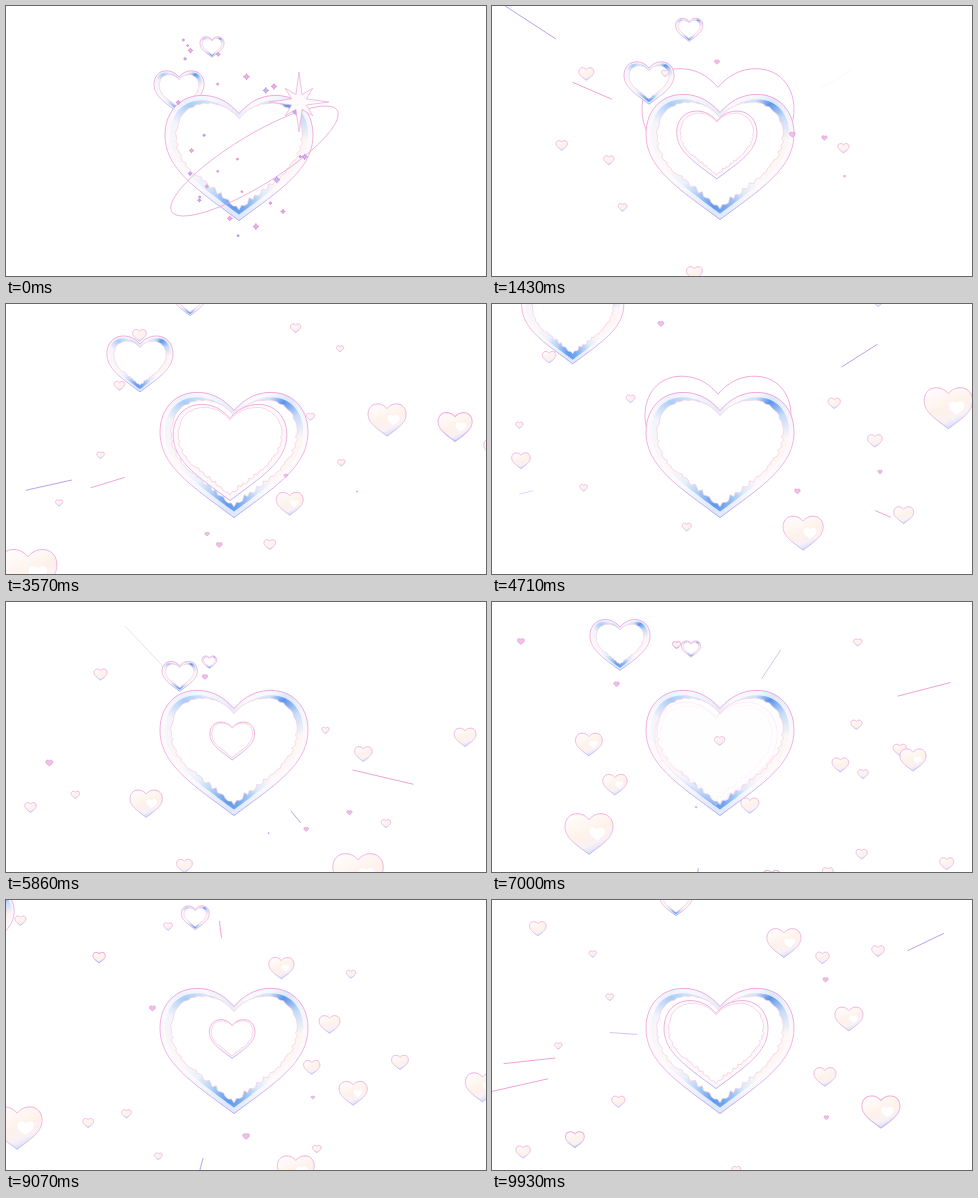
An HTML page with a canvas that plays this animation: 480 by 270 pixels, repeating every 10 s.

```html
<!DOCTYPE html>
<html lang="en">
<head>
<meta charset="utf-8">
<title>Glass hearts</title>
<style>
html, body { margin: 0; width: 100%; height: 100%; overflow: hidden; background: #fff; }
canvas { display: block; width: 480px; height: 270px; }
</style>
</head>
<body>
<canvas id="stage" width="480" height="270"></canvas>
<script>
const ctx = document.getElementById('stage').getContext('2d');
const LOOP = 10, FPS = 14, CX = 228, CY = 140, FLOW = .35;
const clamp = (v, a = 0, b = 1) => Math.min(b, Math.max(a, v));
const mix = (a, b, p) => a + (b - a) * p;
const repeat = (n, make) => Array.from({ length: n }, (_, i) => make(i));

function seeded(seed) {
  return () => {
    seed = seed + 0x6D2B79F5 | 0;
    let v = Math.imul(seed ^ seed >>> 15, 1 | seed);
    v = v + Math.imul(v ^ v >>> 7, 61 | v) ^ v;
    return ((v ^ v >>> 14) >>> 0) / 4294967296;
  };
}

// Right half of a heart one unit wide: two cubic curves from notch to tip.
const lobe = [[0, -.3], [.06, -.37], [.14, -.423], [.25, -.423]];
const side = [[.25, -.423], [.4, -.423], [.5, -.31], [.5, -.155]];
const foot = [[.5, -.155], [.5, .08], [.27, .22], [0, .423]];

function cubic(points, p) {
  const q = 1 - p, weights = [q * q * q, 3 * q * q * p, 3 * q * p * p, p * p * p];
  return [0, 1].map(axis => points.reduce((sum, pt, i) => sum + pt[axis] * weights[i], 0));
}
const rightHalf = [[lobe, 12], [side, 14], [foot, 36]]
  .flatMap(([curve, n]) => repeat(n, i => cubic(curve, i / n)));
const leftHalf = [...rightHalf.slice(1), [0, .423]].reverse().map(([x, y]) => [-x, y]);

// Closed heart whose lower flanks are nibbled inwards by up to `bite`.
function heartPath(bite = 0, seed = 1) {
  const random = seeded(seed), path = new Path2D();
  for (const [x, y] of [...rightHalf, ...leftHalf]) {
    const k = 1 - bite * random() ** 2 * clamp(y + .35, .15, .6);
    path.lineTo(x * k, y * k);
  }
  path.closePath();
  return path;
}
const heart = heartPath();
const ragged = heartPath(.16, 5);

function ramp(gradient, stops) {
  for (const [at, color] of stops) gradient.addColorStop(at, color);
  return gradient;
}
const sheen = ramp(ctx.createConicGradient(0, 0, 0), [
  [0, '#fdf6f3'], [.1, '#fcf8f9'], [.16, '#dcebfb'], [.24, '#6fa6f0'], [.27, '#5f9bef'],
  [.34, '#b5d4f8'], [.4, '#eaf2fc'], [.47, '#fdf8f7'], [.58, '#f4f4fc'], [.63, '#a9cdf7'],
  [.68, '#dcebfb'], [.74, '#7fb0f1'], [.79, '#eef4fc'], [.84, '#cfe2fb'], [.87, '#5a95ec'],
  [.91, '#c6dcf9'], [.96, '#fdf6f5'], [1, '#fdf6f3']]);
const rim = ramp(ctx.createLinearGradient(0, -.42, 0, .42),
  [[0, '#f3a9dc'], [.6, '#efb6e2'], [1, '#b3b0f2']]);
const cream = ramp(ctx.createLinearGradient(-.25, -.4, .1, .42),
  [[0, '#fffcfc'], [.5, '#fef2ea'], [.78, '#f9f1f5'], [1, '#cfdcfa']]);

function at(x, y, w, draw) {
  ctx.save();
  ctx.translate(x, y);
  ctx.scale(w, w);
  draw();
  ctx.restore();
}
function outline(path, w, width, color = rim) {
  ctx.lineWidth = width / w;
  ctx.strokeStyle = color;
  ctx.stroke(path);
}
function fill(path, style) {
  ctx.fillStyle = style;
  ctx.fill(path);
}
function withAlpha(alpha, draw) {
  if (alpha <= 0) return;
  ctx.globalAlpha = Math.min(1, alpha);
  draw();
  ctx.globalAlpha = 1;
}

function ring(x, y, w, hole, body) {
  at(x, y, w, () => {
    fill(heart, body);
    ctx.save();
    ctx.clip(heart);
    outline(heart, 1, .065, 'rgba(255,252,254,.8)');
    ctx.restore();
    outline(heart, w, 1);
  });
  at(x, y - w * .01, w * hole, () => {
    fill(ragged, '#fff');
    outline(ragged, w, .8, '#f6c9de');
  });
}

function bubble(x, y, w) {
  if (w < 1) return;
  at(x, y, w, () => {
    fill(heart, w < 7 ? '#f0c3e6' : cream);
    outline(heart, w, w < 7 ? .8 : 1, w < 7 ? '#dc97da' : rim);
  });
  if (w > 24) at(x + w * .17, y, w * .32, () => fill(heart, '#fff'));
}

function line(x1, y1, x2, y2, width, color) {
  ctx.lineWidth = width;
  ctx.strokeStyle = color;
  ctx.beginPath();
  ctx.moveTo(x1, y1);
  ctx.lineTo(x2, y2);
  ctx.stroke();
}

// Eight tapered rays, every other one shorter.
function star(x, y, r, inner, body, edge) {
  ctx.beginPath();
  for (let i = 0; i < 16; i++) {
    const a = i * Math.PI / 8, reach = i % 2 ? inner : i % 4 ? r * .65 : r;
    ctx.lineTo(x + Math.cos(a) * reach, y + Math.sin(a) * reach);
  }
  ctx.closePath();
  ctx.fillStyle = body;
  ctx.fill();
  ctx.lineWidth = .8;
  ctx.strokeStyle = edge;
  ctx.stroke();
}

// Large bubbles, each pinned where it passes: time, x, y, width.
const landmarks = [
  [3.57, 381, 116, 38], [3.57, 449, 123, 34], [3.57, 22, 270, 58], [4.71, 311, 229, 40],
  [7, 97, 232, 48], [7, 421, 158, 26], [8.29, 22, 144, 42], [8.29, 63, 207, 38],
  [8.29, 275, 240, 28], [8.29, 417, 176, 26], [9.93, 389, 212, 38], [9.93, 292, 43, 34],
  [9.93, 357, 119, 28], [9.93, 333, 177, 22]];

const random = seeded(42);
const swarm = repeat(64, i => ({
  birth: .2 + i * .152, angle: random() * 2 * Math.PI,
  start: mix(45, 130, random()), size: mix(.035, .13, random()),
}));
const streaks = repeat(52, i => ({
  birth: .5 + i * .183, angle: random() * 2 * Math.PI,
  start: mix(70, 170, random()), length: mix(15, 90, random()),
}));
const sparkles = repeat(27, () => ({
  x: mix(166, 300, random()), y: mix(27, 240, random()), r: mix(1.2, 3.6, random() ** 2),
}));

// Drifting rings keyed by time, x, y, width.
const tracks = [
  [[0, 173, 86, 50], [1.43, 157, 77, 50], [3.57, 134, 60, 66], [4.71, 81, 17, 102], [5.5, 20, -55, 130]],
  [[0, 206, 41, 24], [3.57, 184, -2, 32], [4.2, 180, -20, 34]],
  [[5.8, 176, 76, 34], [7, 128, 43, 60], [8.29, 41, 30, 68], [9.4, -60, 20, 80]],
  [[5.7, 204, 62, 14], [8.29, 194, 32, 24], [10.1, 183, -1, 33]]];

const pulseBirths = [.25, 1.9, 5.2, 6.85, 8.4];

function drawLandmark([time, x, y, w], t) {
  const age = t - time, k = Math.exp(FLOW * age);
  const grow = clamp((age + 2.3) / .5) * clamp((1.4 - age) / .3);
  bubble(CX + (x - CX) * k, CY + (y - CY) * k, w * k * grow);
}

function drawSwarmHeart({ birth, angle, start, size }, t) {
  const age = t - birth, life = 2.8;
  if (age < 0 || age > life) return;
  const d = start * Math.exp(FLOW * age);
  const grow = clamp(age / .3) * clamp((life - age) / .3);
  bubble(CX + Math.cos(angle) * d * 1.3, CY + Math.sin(angle) * d * .95, d * size * grow);
}

function drawStreak({ birth, angle, start, length }, i, t) {
  const age = t - birth;
  withAlpha(Math.min(age, .8 - age) / .15, () => {
    const near = start * Math.exp(1.2 * age), far = near + length;
    const dx = Math.cos(angle), dy = Math.sin(angle) * .6;
    line(CX + dx * near, CY + dy * near, CX + dx * far, CY + dy * far,
      1, i % 2 ? '#bda0ec' : '#efa3d6');
  });
}

function drawTrack(keys, t) {
  const i = keys.findIndex((key, n) => n && t >= keys[n - 1][0] && t < key[0]);
  if (i < 1) return;
  const a = keys[i - 1], b = keys[i], p = (t - a[0]) / (b[0] - a[0]);
  const [x, y, w] = [1, 2, 3].map(n => mix(a[n], b[n], p));
  ring(x, y, w, .8, sheen);
}

// A pale outline that slides up behind the main heart.
function drawEcho(peak, y, w, t) {
  withAlpha((1 - Math.abs(t - peak)) / .4, () =>
    at(226, y - 8 * (t - peak), w, () => {
      fill(heart, '#fff');
      outline(heart, w, 1);
    }));
}

function drawPulse(birth, t) {
  const w = (t - birth) * 68;
  if (w < 1 || w > 124) return;
  const x = CX - Math.min(4, w * .04), y = 139 + Math.max(0, w - 90) * .4;
  if (w < 25) bubble(x, y, w);
  else withAlpha((124 - w) / 8, () => ring(x, y, w, .92, '#fdf6f5'));
}

function drawIntro(t) {
  withAlpha((.8 - t) / .5, () => {
    ctx.lineWidth = .8;
    ctx.strokeStyle = '#eb9fd0';
    ctx.beginPath();
    ctx.ellipse(248.5, 155, 97, 25, -.55 + t * .2, 0, 2 * Math.PI);
    ctx.stroke();
    star(293, 96, 30, 8, '#fffafc', '#f0b0dc');
    const k = Math.exp(FLOW * t);
    sparkles.forEach(({ x, y, r }, i) =>
      star(CX + (x - CX) * k, CY + (y - CY) * k, r, r * .4, '#eec0e6', i % 3 ? '#df8fd3' : '#b393e6'));
  });
}

function render(t) {
  const settle = clamp(1 - t / .7);
  ctx.fillStyle = '#fff';
  ctx.fillRect(0, 0, 480, 270);
  streaks.forEach((s, i) => drawStreak(s, i, t));
  drawEcho(1.43, 127, 152, t);
  drawEcho(4.71, 134, 146, t);
  tracks.forEach(keys => drawTrack(keys, t));
  ring(CX + 5 * settle, 151 + settle, 148, .86, sheen);
  pulseBirths.forEach(birth => drawPulse(birth, t));
  swarm.forEach(s => drawSwarmHeart(s, t));
  landmarks.forEach(l => drawLandmark(l, t));
  drawIntro(t);
}

function tick() {
  const seconds = performance.now() / 1000 % LOOP;
  render(Math.floor(seconds * FPS + .1) % (LOOP * FPS) / FPS);
  requestAnimationFrame(tick);
}
tick();
</script>
</body>
</html>
```
